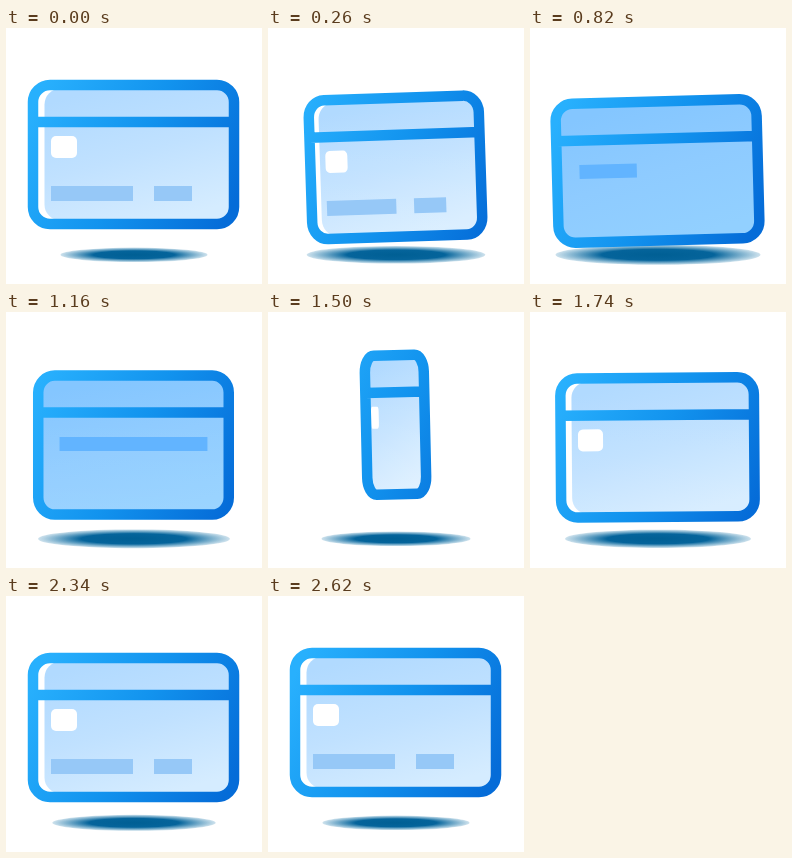
Recreate the animation shown at these times as an HTML page with a canvas. Size 256 by 256 pixels, loop 2640 ms.

```html
<!DOCTYPE html>
<html lang="en">
<head>
<meta charset="utf-8">
<title>Spinning card</title>
<style>
html, body { margin: 0; width: 100%; height: 100%; overflow: hidden; background: #fff; }
canvas { display: block; width: 256px; height: 256px; }
</style>
</head>
<body>
<canvas id="stage" width="256" height="256"></canvas>
<script>
const LOOP = 2640;
const ctx = document.getElementById('stage').getContext('2d');

// Eased 0..1 progress between two times
function ease(t, from, to) {
  const u = Math.min(1, Math.max(0, (t - from) / (to - from)));
  return (1 - Math.cos(Math.PI * u)) / 2;
}

// Moves through [time, value] stops, easing between each pair
function track(t, ...stops) {
  return stops.slice(1).reduce((value, [time, next], i) =>
    value + (next - stops[i][1]) * ease(t, stops[i][0], time), stops[0][1]);
}

// Two hops, the second lower than the first
const height = t => track(t, [0, 126.5], [215, 143], [490, 89], [760, 143], [960, 143],
  [1480, 112.5], [1860, 142], [LOOP, 126.5]);
const shadowWidth = t => track(t, [0, 147], [170, 192], [510, 112], [820, 205], [1000, 205],
  [1500, 149], [1860, 198], [LOOP, 147]);
const tilt = t => track(t, [0, 0], [240, -2], [510, 7], [820, -1.5], [1140, 0], [1490, -1.3], [1900, 0]);
const spin = t => Math.PI * (ease(t, 40, 835) + ease(t, 960, 1925));

function gradient(x0, y0, x1, y1, ...colors) {
  const g = ctx.createLinearGradient(x0, y0, x1, y1);
  colors.forEach((c, i) => g.addColorStop(i / (colors.length - 1), c));
  return g;
}

function box(color, x, y, w, h, r = 0) {
  ctx.fillStyle = color;
  ctx.beginPath();
  ctx.roundRect(x, y, w, h, r);
  ctx.fill();
}

function drawShadow(width) {
  const g = ctx.createRadialGradient(0, 0, 0, 0, 0, 1);
  g.addColorStop(0, '#005f94');
  g.addColorStop(0.55, '#05649b');
  g.addColorStop(1, 'rgba(10, 110, 165, 0.2)');
  ctx.save();
  ctx.translate(128, 226.8);
  ctx.scale(width / 2, width * 0.049);
  ctx.fillStyle = g;
  ctx.beginPath();
  ctx.arc(0, 0, 1, 0, Math.PI * 2);
  ctx.fill();
  ctx.restore();
}

function drawFront(t, body, sheen) {
  const rewritten = t > LOOP / 2;
  const first = rewritten ? ease(t, 1750, 2000) : 1;
  const second = rewritten ? ease(t, 2040, 2300) : 1;
  const face = [-89, -66, 189, 132, [16, 0, 0, 16]];
  box('#fff', ...body);
  box(gradient(-20, -70, 20, 70, '#b1daff', '#c0e1ff', '#d5ecff'), ...face);
  box(sheen, ...face);
  box('#fff', -82.5, -18.5, 26, 22, 5);
  box('#96c8f7', -82.5, 31.5, 82 * first, 15);
  box('#96c8f7', 20.5, 31.5, 38 * second, 15);
}

function drawBack(t, body, sheen) {
  box(gradient(-20, -70, 20, 70, '#84c6ff', '#8ecbff', '#92d0ff'), ...body);
  box(sheen, ...body);
  box('#62b4ff', -78, -8, 156 * ease(t, 680, 1020), 14);
}

function drawCard(t) {
  const turn = Math.cos(spin(t));
  const s = Math.max(0.005, Math.abs(turn));
  // Corners flatten less than the card does
  const body = [-100.5, -69.5, 201, 139, { x: 17 / Math.sqrt(s), y: 17 }];
  const glow = 0.25 * Math.abs(Math.sin(spin(t)));
  const sheen = gradient(0, -60, 0, 60, 'rgba(255, 255, 255, 0)', `rgba(255, 255, 255, ${glow})`);

  ctx.save();
  ctx.translate(127.5, height(t));
  ctx.rotate(tilt(t) * Math.PI / 180);

  ctx.save();
  ctx.scale(s, 1);
  (turn > 0 ? drawFront : drawBack)(t, body, sheen);
  ctx.beginPath();
  ctx.roundRect(...body);
  ctx.moveTo(-100.5, -32.5);
  ctx.lineTo(100.5, -32.5);
  ctx.restore();

  // The outline keeps its weight while the card narrows
  ctx.lineWidth = 10.5;
  ctx.strokeStyle = gradient(-100, -50, 100, 50, '#28b0fd', '#1293ee', '#056cd8');
  ctx.stroke();
  ctx.restore();
}

const start = performance.now();

function frame() {
  const t = (performance.now() - start) % LOOP;
  ctx.clearRect(0, 0, 256, 256);
  drawShadow(shadowWidth(t));
  drawCard(t);
  requestAnimationFrame(frame);
}

frame();
</script>
</body>
</html>
```
